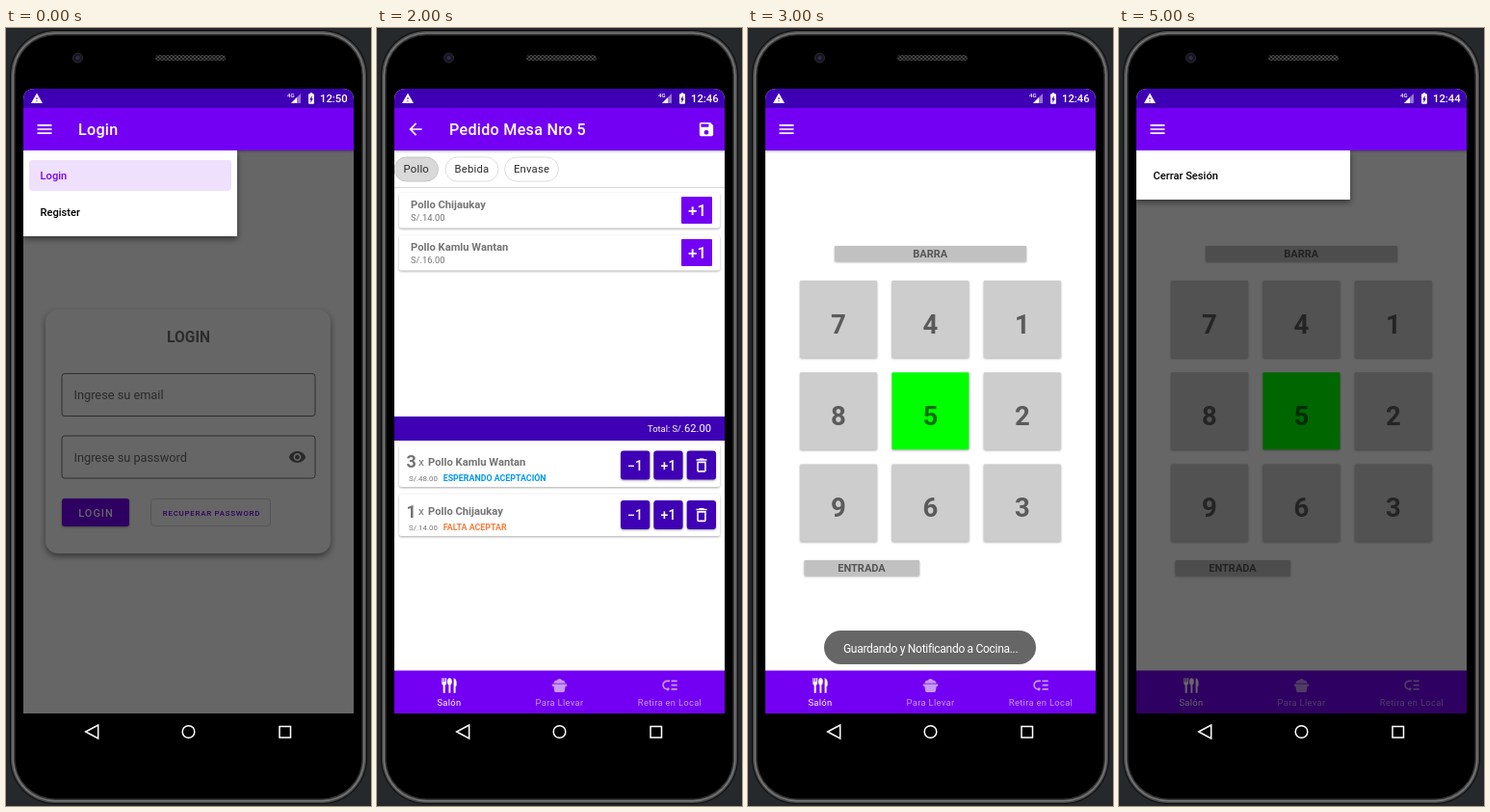
An HTML page for the animation above (6000 ms loop, 379 by 807 pixels).

```html
<!DOCTYPE html>
<html lang="es">
<head>
<meta charset="utf-8">
<title>Pedidos</title>
<style>
  html, body { margin: 0; width: 100%; height: 100%; overflow: hidden; background: #25292c; }
  svg { display: block; width: 379px; height: 807px; font-family: Roboto, sans-serif; }
  text { white-space: pre; }
  .lift { filter: drop-shadow(0 1px 1px #0005); }
  .float { filter: drop-shadow(0 3px 3px #0007); }
</style>
</head>
<body>
<svg id="stage" viewBox="0 0 379 807"></svg>
<script>
const PURPLE = '#7300f3', DARK = '#3f00b5', GRAY = '#747474';
const STEP = 1000;

const ICONS = {
  menu: 'M3 18h18v-2H3v2zm0-5h18v-2H3v2zm0-7v2h18V6H3z',
  back: 'M20 11H7.83l5.59-5.59L12 4l-8 8 8 8 1.41-1.41L7.83 13H20v-2z',
  save: 'M17 3H5c-1.11 0-2 .9-2 2v14c0 1.1.89 2 2 2h14c1.1 0 2-.9 2-2V7l-4-4zm-5 16c-1.66 0-3-1.34-3-3s1.34-3 3-3 3 1.34 3 3-1.34 3-3 3zm3-10H5V5h10v4z',
  warning: 'M1 21h22L12 2 1 21zm12-3h-2v-2h2v2zm0-4h-2v-4h2v4z',
  battery: 'M15.67 4H14V2h-4v2H8.33C7.6 4 7 4.6 7 5.33v15.33C7 21.4 7.6 22 8.33 22h7.33c.74 0 1.34-.6 1.34-1.33V5.33C17 4.6 16.4 4 15.67 4zM11 20v-5.5H9L13 7v5.5h2L11 20z',
  eye: 'M12 4.5C7 4.5 2.73 7.61 1 12c1.73 4.39 6 7.5 11 7.5s9.27-3.11 11-7.5c-1.73-4.39-6-7.5-11-7.5zM12 17c-2.76 0-5-2.24-5-5s2.24-5 5-5 5 2.24 5 5-2.24 5-5 5zm0-8c-1.66 0-3 1.34-3 3s1.34 3 3 3 3-1.34 3-3-1.34-3-3-3z',
  bin: 'M6 19c0 1.1.9 2 2 2h8c1.1 0 2-.9 2-2V7H6v12zM8 9h8v10H8V9zm7.5-5l-1-1h-5l-1 1H5v2h14V4z',
  binCross: 'M6 19c0 1.1.9 2 2 2h8c1.1 0 2-.9 2-2V7H6v12zm2.46-7.12l1.41-1.41L12 12.59l2.12-2.12 1.41 1.41L13.41 14l2.12 2.12-1.41 1.41L12 15.41l-2.12 2.12-1.41-1.41L10.59 14l-2.13-2.12zM15.5 4l-1-1h-5l-1 1H5v2h14V4z',
  chevron: 'M10 6L8.59 7.41 13.17 12l-4.58 4.59L10 18l6-6z',
  erase: 'M22 3H7c-.69 0-1.23.35-1.59.88L0 12l5.41 8.11c.36.53.9.89 1.59.89h15c1.1 0 2-.9 2-2V5c0-1.1-.9-2-2-2zm-3 12.59L17.59 17 14 13.41 10.41 17 9 15.59 12.59 12 9 8.41 10.41 7 14 10.59 17.59 7 19 8.41 15.41 12 19 15.59z',
  cutlery: 'M2 2h1.4v5h1V2h1.4v5h1V2h1.4v7q0 2-1.8 2.6V22H3.8V11.6Q2 11 2 9zM12.5 2c4 0 4 8 1.2 9.4V22h-2.4V11.4C8.5 10 8.5 2 12.5 2zM18 2c4 1 4.5 7 3.5 11h-1v9H18z',
  pot: 'M9 5q0-2 3-2t3 2q4 0 5 4H4q1-4 5-4zM2 10h20v3h-2l-1 6q-.4 2-2 2H7q-1.6 0-2-2l-1-6H2z',
  pickup: 'M14 5h8v2h-8zm0 5.5h8v2h-8zm0 5.5h8v2h-8zM2 11.5C2 15.08 4.92 18 8.5 18H9v2l3-3-3-3v2h-.5C6.02 16 4 13.98 4 11.5S6.02 7 8.5 7H12V5H8.5C4.92 5 2 7.92 2 11.5z'
};

const box = (x, y, w, h, fill, r = 0, extra = '') =>
  `<rect x="${x}" y="${y}" width="${w}" height="${h}" rx="${r}" fill="${fill}" ${extra}/>`;
const lifted = (x, y, w, h, fill, r = 1) => box(x, y, w, h, fill, r, 'class="lift"');
const label = (x, y, size, str, fill = '#fff', weight = 400, anchor = 'start', spacing = 0) =>
  `<text x="${x}" y="${y}" font-size="${size}" fill="${fill}" font-weight="${weight}" text-anchor="${anchor}" letter-spacing="${spacing}">${str}</text>`;
const icon = (name, cx, cy, size, fill = '#fff') =>
  `<path d="${ICONS[name]}" fill="${fill}" transform="translate(${cx - size / 2} ${cy - size / 2}) scale(${size / 24})"/>`;
const button = (x, y, w, str) =>
  lifted(x, y, w, 29, PURPLE, 3) + label(x + w / 2 + .5, y + 18.5, 11, str, '#fff', 500, 'middle', .98);
const scrim = box(18, 127, 343, 584, '#000', 0, 'opacity=".6"');

function phone() {
  const rim = (inset, fill) =>
    box(4 + inset, 2 + inset, 371 - inset * 2, 803 - inset * 2, fill, 47 - inset);
  return `<defs>
    <clipPath id="glass"><path d="M18 711V75q0-12 12-12H349q12 0 12 12V711z"/></clipPath>
    <pattern id="mesh" width="4" height="4" patternUnits="userSpaceOnUse">
      <path d="M0 4L4 0M0 0L4 4" stroke="#484848" stroke-width=".9"/></pattern></defs>`
    + box(0, 0, 379, 807, '#25292c')
    + rim(0, '#0c0c0c') + rim(1, '#454545') + rim(2.5, '#777') + rim(4, '#3c3c3c') + rim(5.5, '#000')
    + '<circle cx="74.5" cy="31" r="5" fill="#17171d" stroke="#2a2a30"/><circle cx="74.5" cy="31" r="2" fill="#2c2c58"/>'
    + box(155, 28, 73, 6, '#151515', 3) + box(155, 28, 73, 6, 'url(#mesh)', 3);
}

function chrome(time, title, lead) {
  return lifted(18, 83, 343, 44, PURPLE, 0) + box(18, 63, 343, 20, DARK)
    + icon('warning', 32, 73, 13) + label(292, 72, 6, '4G', '#fff', 500)
    + '<path d="M306 68V78H296z" fill="#fff" opacity=".45"/><path d="M302 72V78H296z" fill="#fff"/>'
    + icon('battery', 317, 73, 14) + label(326, 77, 11.3, time, '#fff', 500)
    + icon(lead, 40, 105, 20) + label(75, 111, 16.1, title, '#fff', 500, 'start', .28);
}

function navigation(down) {
  const back = down ? 'M82.5 724H97L89.7 736.5z' : 'M82.700 730L95.700 723V737z';
  return `<g fill="none" stroke="#fff" stroke-width="1.5"><path d="${back}"/>
    <circle cx="189.5" cy="730" r="6.3"/><path d="M284 724.5h11.5V736H284z"/></g>`;
}

function tabs() {
  const items = [['cutlery', 75, 'Salón'], ['pot', 189.5, 'Para Llevar'], ['pickup', 304, 'Retira en Local']];
  return box(18, 666.5, 343, 44.5, PURPLE) + items.map(([name, x, str], i) => {
    const fill = i ? '#c799fa' : '#fff';
    return icon(name, x, 682, 18.5, fill) + label(x, 703, 9.4, str, fill, 400, 'middle', .31);
  }).join('');
}

function drawer(items, selected) {
  return scrim + box(18, 127, 222, 13 + items.length * 38, '#fff', 0, 'class="float" clip-path="inset(0 -9px -9px 0)"')
    + (selected ? box(24, 137, 210, 32, '#efe0fd', 4) : '')
    + items.map((str, i) =>
      label(35.5, 157 + i * 38, 11.15, str, str === selected ? PURPLE : '#000', 500)).join('');
}

function hall(busy) {
  let out = lifted(90, 226, 199, 16, '#c1c1c1') + label(189.2, 238, 11, 'BARRA', '#555', 700, 'middle')
    + lifted(58.5, 552, 119.5, 16, '#c1c1c1') + label(118, 564, 11, 'ENTRADA', '#555', 700, 'middle');
  for (let n = 1; n <= 9; n++) {
    const x = 54 + 95.4 * (2 - Math.floor((n - 1) / 3)), y = 262 + 95.2 * ((n - 1) % 3);
    out += lifted(x, y, 80, 80, n === busy ? '#00ff00' : '#cdcdcd')
      + label(x + 40, y + 55, 27.5, n, n === busy ? '#007000' : '#5b5b5b', 700, 'middle');
  }
  return out + tabs();
}

function loginForm() {
  const field = (y, str) => box(58, y, 263, 44, 'none', 3, 'stroke="#777"') + label(70.5, y + 26.5, 12.75, str, '#686868');
  return box(41, 292, 296, 253, '#fff', 13, 'class="float"')
    + label(189.5, 326, 15.6, 'LOGIN', '#6e6e6e', 700, 'middle')
    + field(358.5, 'Ingrese su email') + field(423, 'Ingrese su password')
    + icon('eye', 302.5, 445, 19, '#686868') + button(58, 488, 70, 'LOGIN')
    + box(150.5, 488.5, 124, 28, 'none', 3, 'stroke="#d5d5d5"')
    + label(213.5, 505.5, 7.9, 'RECUPERAR PASSWORD', PURPLE, 500, 'middle', .75);
}

function order() {
  const chip = (x, w, str, fill, stroke) => box(x, 134, w, 25, fill, 12.5, `stroke="${stroke}"`)
    + label(x + w / 2, 150, 11.3, str, '#2b2b2b', 400, 'middle', .2);
  const product = (y, name, price) => lifted(23, y, 333, 36.5, '#fff', 2)
    + label(35, y + 16, 11.2, name, GRAY, 700) + label(35, y + 29, 9.4, price, GRAY)
    + box(316, y + 4, 32, 28, PURPLE, 1) + label(332.5, y + 23.7, 16.8, '+1', '#fff', 500, 'middle');
  const line = (y, h, count, name, price, state, color) => lifted(23, y, 333, h, '#fff', 2)
    + label(30.5, y + 24, 18, count, GRAY, 700) + label(43, y + 21.5, 11.8, 'x', GRAY)
    + label(53, y + 21.5, 11.2, name, GRAY, 700)
    + label(33, y + 37.5, 7.9, price, GRAY) + label(68.7, y + 37.8, 8.85, state, color, 700)
    + [253, 287.3, 321.7].map(x => lifted(x, y + 6.5, 30.3, 30, DARK, 3)).join('')
    + label(268, y + 26.5, 14, '−1', '#fff', 500, 'middle') + label(302.5, y + 26.5, 14, '+1', '#fff', 500, 'middle')
    + icon('bin', 337, y + 21.5, 19);
  return chip(18, 45.5, 'Pollo', '#d9d9d9', '#c6c6c6') + chip(71, 55, 'Bebida', '#fff', '#dedede')
    + chip(132.5, 56, 'Envase', '#fff', '#dedede') + box(18, 165, 343, 1, '#d6d6d6')
    + product(171, 'Pollo Chijaukay', 'S/.14.00') + product(215, 'Pollo Kamlu Wantan', 'S/.16.00')
    + box(18, 403, 343, 25, DARK) + label(281, 419, 9.4, 'Total: S/.') + label(319, 419, 11.2, '62.00')
    + line(432, 44, 3, 'Pollo Kamlu Wantan', 'S/.48.00', 'ESPERANDO ACEPTACIÓN', '#0299ea')
    + line(483.5, 43.5, 1, 'Pollo Chijaukay', 'S/.14.00', 'FALTA ACEPTAR', '#f77b3c') + tabs();
}

function takeaway() {
  const field = (y, h, name, gap, value, active) => box(26.5, y, 326, h, '#fff', 3,
      `stroke="${active ? PURPLE : '#989898'}" stroke-width="${active ? 1.7 : 1}"`)
    + box(36, y - 1, gap, 2, '#f0f0f0') + label(39, y + 4, 9.4, name, active ? PURPLE : '#666', 400, 'start', .2)
    + label(38.7, y + 27, 12.75, value, '#222');
  return box(18, 127, 343, 233, '#e4e4e4')
    + field(140, 44, 'Nombre de Cliente', 88, 'Nelo') + field(188.5, 44, 'Apellido (opcional)', 90, 'Dorvi')
    + field(254, 43, 'Celular (opcional)', 85, '000111000', true)
    + button(26, 318, 165, 'CANCELAR') + button(207, 318, 146, 'CREAR')
    + lifted(29, 382, 322, 63.5, '#fff', 2) + lifted(36, 394, 38, 40, '#fff', 3)
    + icon('binCross', 55, 414.5, 38, PURPLE)
    + label(86.5, 406, 15.8, 'DSTGD', '#666', 700) + label(86.5, 422, 11.2, 'Iniciado: 9:27 pm', GRAY)
    + label(86.5, 437, 11.2, 'PEDIDO SIN ITEMS', '#f4432c', 700) + icon('chevron', 334.5, 398, 19, '#666')
    + keyboard();
}

function keyboard() {
  const columns = [64, 155, 247, 327];
  const keys = ['123-', '456,', '789', '.0'].map((row, r) => [...row].map((key, c) =>
    label(columns[c], 537 + r * 52.3, c === 3 ? 30 : 36.5, key, '#33474f', 400, 'middle')).join('')).join('');
  return box(18, 498, 343, 213, '#eceff1') + keys + box(236, 695, 22, 1.5, '#5f6f76')
    + icon('erase', 327, 628.5, 19, '#7b898f')
    + '<circle cx="326.5" cy="681" r="14.5" fill="#00b5ab"/>' + icon('chevron', 326.5, 681, 19);
}

const toast = () => box(79, 625, 220, 35, '#666', 17.5)
  + label(99, 647.5, 12, 'Guardando y Notificando a Cocina...', '#fff', 400, 'start', -.3);

const screens = [
  { time: '12:50', title: 'Login', body: loginForm(), over: drawer(['Login', 'Register'], 'Login') },
  { time: '12:56', body: hall() },
  { time: '12:46', title: 'Pedido Mesa Nro 5', lead: 'back', body: order(), over: icon('save', 342, 105, 19) },
  { time: '12:46', body: hall(5) + toast() },
  { time: '12:47', title: 'Para Llevar', lead: 'back', body: takeaway(), down: true },
  { time: '12:44', body: hall(5), over: drawer(['Cerrar Sesión']) }
];

const stage = document.getElementById('stage');
stage.innerHTML = phone() + screens.map(({ time, title = '', lead = 'menu', body, over = '', down }) =>
  `<g class="screen"><g clip-path="url(#glass)">${box(18, 63, 343, 648, '#fff')}${body}${chrome(time, title, lead)}${over}</g>${navigation(down)}</g>`).join('');

// Each screen holds for one step, then cuts to the next.
const duration = STEP * screens.length;
document.querySelectorAll('.screen').forEach((screen, i) => screen.animate([
  { opacity: 1, offset: 0, easing: 'step-end' },
  { opacity: 0, offset: 1 / screens.length, easing: 'step-end' },
  { opacity: 0, offset: 1 }
], { duration, delay: i * STEP - duration, iterations: Infinity }));
</script>
</body>
</html>
```
